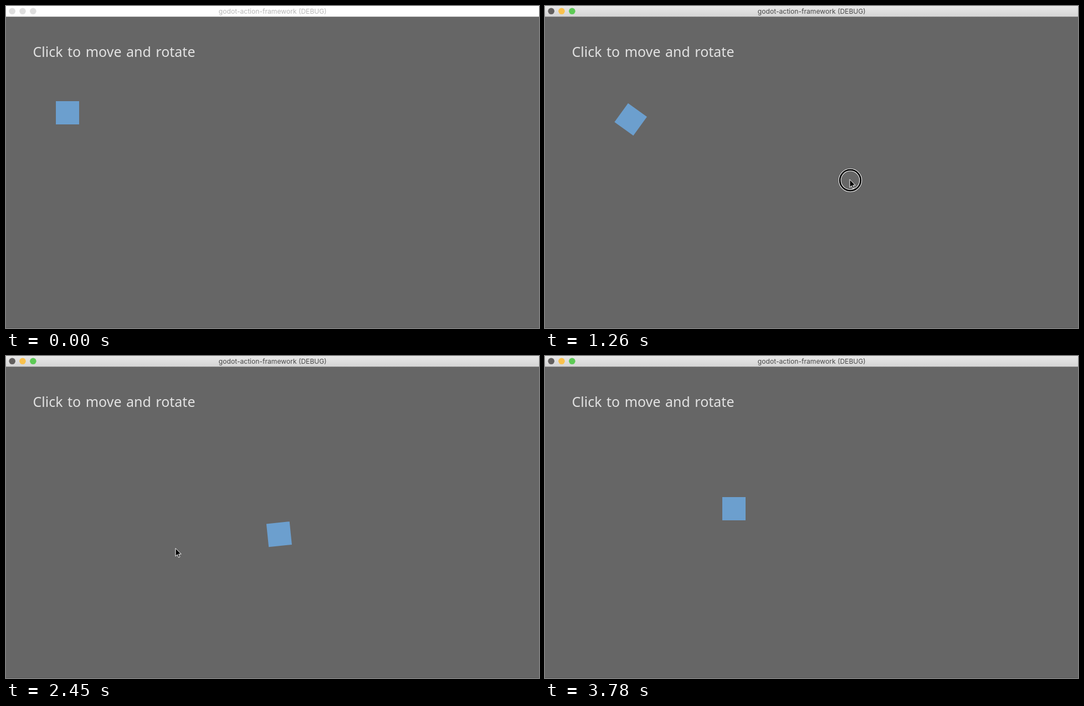
Recreate the animation shown at these times as an HTML page. Size 962 px wide and 582 px high, loop 3.85 s.

```html
<!DOCTYPE html>
<html lang="en">
<head>
<meta charset="utf-8">
<title>Click to move and rotate</title>
<style>
  html, body { margin: 0; width: 100%; height: 100%; overflow: hidden; background: #666; }
  svg { display: block; width: 962px; height: 582px; }
  .title { font: 12.1px Inter, "Liberation Sans", sans-serif; text-anchor: middle; }
  .label { font: 25px "Noto Sans", "Open Sans", sans-serif; word-spacing: 2px; fill: #e2e2e2; }
</style>
</head>
<body>
<svg viewBox="0 0 962 582">
  <defs>
    <linearGradient id="bar" x2="0" y2="1">
      <stop stop-color="#e8e8e8"/>
      <stop offset="1" stop-color="#d4d4d4"/>
    </linearGradient>
  </defs>
  <rect width="962" height="582" fill="#666"/>
  <rect y="581" width="962" height="1" fill="#5a5a5a"/>
  <rect id="titlebar" width="962" height="19.3"/>
  <circle class="light" cx="11.2" cy="9.3" r="5.8"/>
  <circle class="light" cx="30" cy="9.3" r="5.8"/>
  <circle class="light" cx="48.9" cy="9.3" r="5.8"/>
  <text id="title" class="title" x="481.3" y="14">godot-action-framework (DEBUG)</text>
  <text class="label" x="48.5" y="92">Click to move and rotate</text>
  <rect id="sprite" x="-21" y="-21" width="42" height="42" fill="#6c9fce"/>
  <g id="cursor">
    <g id="ring" fill="none" transform="translate(1 1.5)">
      <circle r="18.8" stroke="#fff" stroke-width="4.8"/>
      <circle r="18.8" stroke="#000" stroke-width="2.8"/>
    </g>
    <path d="M0 0V14.5L3.3 11.4L5.5 16.5L7.8 15.5L5.6 10.5H10.2Z" fill="#000" stroke="#fff"/>
  </g>
</svg>
<script>
const LOOP = 3850, STEP = 70, MOVE = 740;
const FOCUS = 700;
const LIGHTS = ['#625f5e', '#f9c14c', '#5cca55'];

const stops = [[111, 193], [550, 314], [306, 349], [341, 276]];
const starts = [1066, 2177, 3030];
const presses = [[700, 840], [1050, 1400], [2170, 2310], [3010, 3150]];
// Pointer path: time, x, y
const path = [
  [70, 950, 520], [560, 550, 313.5], [1890, 550, 313.5], [2120, 306, 347.5],
  [2500, 306, 347.5], [2940, 329, 295.5], [3010, 341, 276], [3290, 341, 276],
  [3710, 420, 586]
];

const $ = id => document.getElementById(id);
const titlebar = $('titlebar'), title = $('title'), sprite = $('sprite');
const cursor = $('cursor'), ring = $('ring');
const lights = document.querySelectorAll('.light');

const clamp = v => Math.min(1, Math.max(0, v));
const mix = (a, b, k) => a + (b - a) * k;
const ease = (k, p) => k < .5 ? (2 * k) ** p / 2 : 1 - (2 - 2 * k) ** p / 2;
const show = (el, on) => el.setAttribute('visibility', on ? 'inherit' : 'hidden');

function pointer(t) {
  let i = 0;
  while (i < path.length - 2 && t >= path[i + 1][0]) i++;
  const [t0, x0, y0] = path[i], [t1, x1, y1] = path[i + 1];
  const k = ease(clamp((t - t0) / (t1 - t0)), 1.6);
  return [mix(x0, x1, k), mix(y0, y1, k)];
}

function drawWindow(active) {
  titlebar.setAttribute('fill', active ? 'url(#bar)' : '#fefefe');
  title.setAttribute('fill', active ? '#484848' : '#b8b8b8');
  lights.forEach((el, i) => el.setAttribute('fill', active ? LIGHTS[i] : '#dedede'));
}

function drawSprite(t) {
  let [x, y] = stops[0], turn = 0;
  starts.forEach((start, i) => {
    if (t < start) return;
    const k = ease(clamp((t - start) / MOVE), 2.5);
    x = mix(stops[i][0], stops[i + 1][0], k);
    y = mix(stops[i][1], stops[i + 1][1], k);
    turn = 360 * k;
  });
  sprite.setAttribute('transform', `translate(${x} ${y}) rotate(${turn})`);
}

function draw(t) {
  drawWindow(t >= FOCUS);
  drawSprite(t);
  cursor.setAttribute('transform', `translate(${pointer(t)})`);
  show(cursor, t >= path[0][0] && t <= path[path.length - 1][0]);
  show(ring, presses.some(([a, b]) => t >= a && t < b));
}

const began = performance.now();
function tick() {
  const t = (performance.now() - began) % LOOP;
  draw(Math.floor(t / STEP) * STEP);
  requestAnimationFrame(tick);
}
tick();
</script>
</body>
</html>
```
